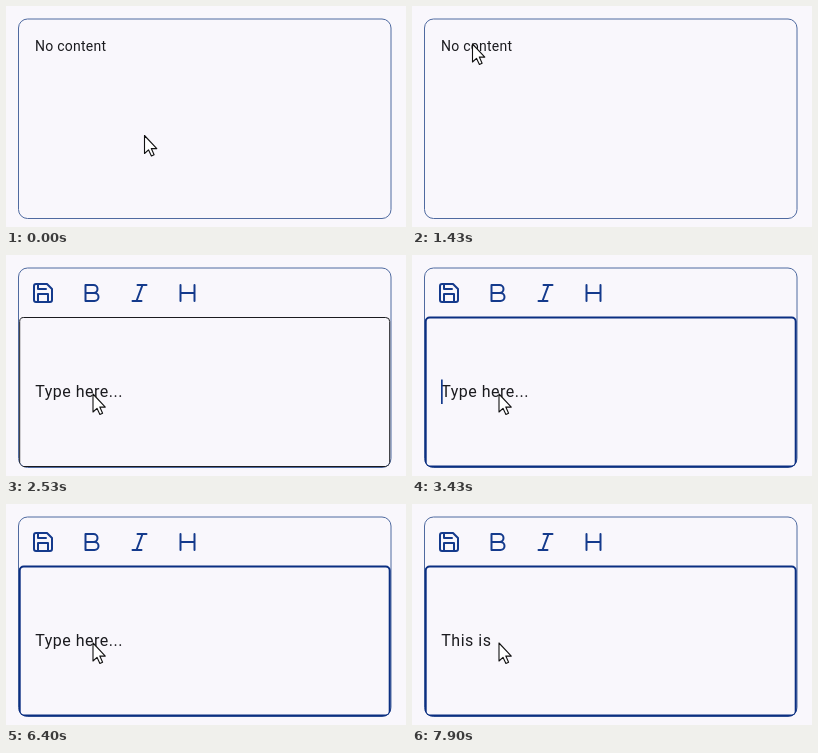
Recreate the animation shown at these times as an HTML page. Size 400x221 px, loop 8000 ms.

```html
<!DOCTYPE html>
<html lang="en">
<head>
<meta charset="utf-8">
<title>Rich text editor</title>
<style>
  html, body { margin: 0; width: 100%; height: 100%; overflow: hidden; background: #f9f7fc; }
  svg { display: block; width: 100vw; height: 100vh; }
  text { font-family: Roboto, Arial, sans-serif; fill: #1b1b1f; white-space: pre; }
  #empty { font-size: 14px; letter-spacing: .25px; }
  #line { font-size: 16px; letter-spacing: .5px; }
  .icon { fill: none; stroke: #143a8c; stroke-width: 2; stroke-linecap: round; stroke-linejoin: round; }
</style>
</head>
<body>
<svg viewBox="0 0 400 221">
  <clipPath id="card"><rect x="12" y="12.5" width="373.5" height="200.5" rx="9.5"/></clipPath>
  <rect x="12.5" y="13" width="372.5" height="199.5" rx="9" fill="none" stroke="#4f6aa0"/>
  <text id="empty" x="29" y="45">No content</text>
  <g id="editor">
    <g class="icon">
      <path transform="translate(25 26)" d="M19 21H5a2 2 0 0 1-2-2V5a2 2 0 0 1 2-2h11l5 5v11a2 2 0 0 1-2 2zM17 21v-8H7v8M7 3v5h8"/>
      <path transform="translate(73.5 26)" d="M6 4h8a4 4 0 0 1 0 8H6zM6 12h9a4 4 0 0 1 0 8H6z"/>
      <path transform="translate(121.5 26)" d="M19 4h-9M14 20H5M15 4L9 20"/>
      <path transform="translate(169.5 26)" d="M5 12h14M5 20V4M19 20V4"/>
    </g>
    <g clip-path="url(#card)">
      <rect id="field" x="13.7" y="62.5" width="370" height="149" rx="4" fill="none"/>
    </g>
    <text id="line" x="29.3" y="142"></text>
    <rect id="caret" y="124.5" width="1.7" height="24.5" fill="#143a8c"/>
  </g>
  <path id="pointer" fill="#fff" stroke="#111" stroke-width="1.1" stroke-linejoin="round"
    d="M.5 .5V18.5L4.5 14.8L7.4 21L10.1 19.8L7.3 13.6H12.8Z"/>
</svg>
<script>
const LOOP = 8000, OPEN = 1700, HOVER = 1880, FOCUS = 2970;
const HINT = 'Type here...';
const $ = id => document.getElementById(id);
const [empty, editor, field, line, caret, pointer] =
  ['empty', 'editor', 'field', 'line', 'caret', 'pointer'].map($);

// time, x, y of the pointer tip
const path = [
  [0, 138, 129], [740, 67, 49], [800, 66, 48], [870, 66, 48], [1000, 61, 39],
  [1400, 61, 39], [1430, 60, 37.5], [1700, 60, 37.5], [2070, 127.5, 115],
  [2500, 86.5, 137.5], [2530, 86.5, 138.5]
];

// time, text, caret shown
const typing = [
  [0, HINT, false], [3000, HINT, true], [4070, HINT, false],
  [4800, 'T', false], [5600, '', true], [5800, HINT, true], [6100, HINT, false],
  [6600, '', true], [6670, 'T', true], [7000, 'Th', true], [7100, 'Thi', true],
  [7200, 'This', true], [7430, 'This ', false], [7530, 'This i', true],
  [7700, 'This is', true], [7770, 'This is ', true], [7900, 'This is ', false]
];

const clamp = v => Math.min(1, Math.max(0, v));
const smooth = v => v * v * (3 - 2 * v);
const mix = (a, b, k) => a + (b - a) * k;

function pointerAt(t) {
  const i = path.findIndex(p => p[0] > t);
  if (i < 0) return path[path.length - 1].slice(1);
  const a = path[i - 1], b = path[i];
  const k = smooth((t - a[0]) / (b[0] - a[0]));
  return [mix(a[1], b[1], k), mix(a[2], b[2], k)];
}

function caretX(text) {
  const w = text && text !== HINT ? line.getComputedTextLength() : 0;
  return 29 + w;
}

function draw(t) {
  const open = t >= OPEN;
  empty.style.display = open ? 'none' : '';
  editor.style.display = open ? '' : 'none';

  if (open) {
    const k = smooth(clamp((t - FOCUS) / 150));
    const rest = t < HOVER ? [116, 119, 127] : [27, 27, 31];
    const rgb = [11, 47, 130].map((c, i) => Math.round(mix(rest[i], c, k)));
    field.setAttribute('stroke', `rgb(${rgb})`);
    field.setAttribute('stroke-width', 1 + k);

    const [, text, shown] = typing.filter(s => s[0] <= t).pop();
    if (line.textContent !== text) line.textContent = text;
    caret.style.display = shown ? '' : 'none';
    if (shown) caret.setAttribute('x', caretX(text));
  }
  pointer.setAttribute('transform', `translate(${pointerAt(t)})`);
}

const start = performance.now();
function tick() {
  draw((performance.now() - start) % LOOP);
  requestAnimationFrame(tick);
}
tick();
</script>
</body>
</html>
```
